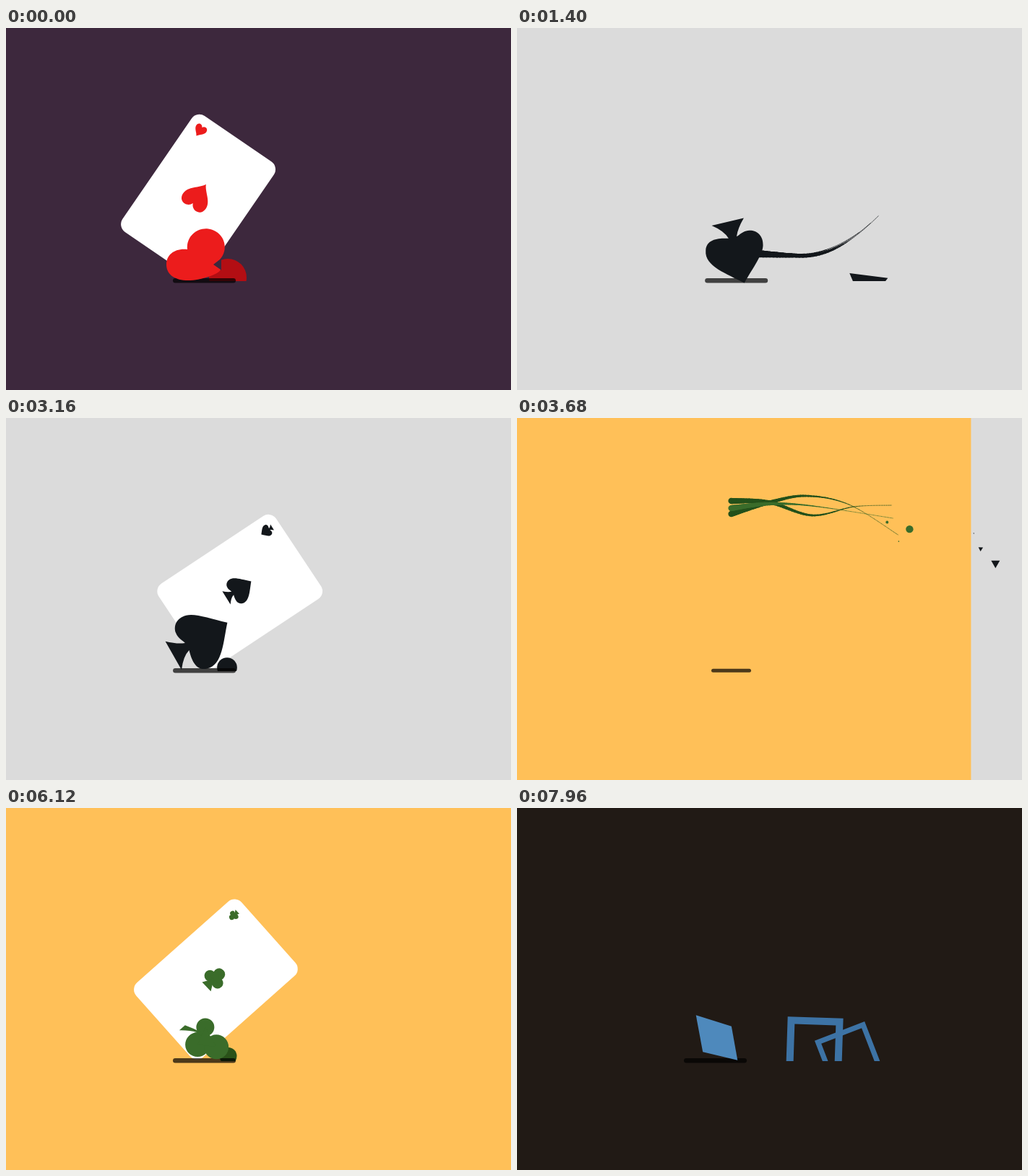
These frames come from a looping animation (699 px wide and 502 px high, 8000 ms). An HTML page with a canvas:

```html
<!DOCTYPE html>
<html lang="en">
<head>
<meta charset="utf-8">
<title>Rolling suits</title>
<style>
html, body { margin: 0; width: 100%; height: 100%; overflow: hidden; background: #3d283d; }
canvas { display: block; }
</style>
</head>
<body>
<canvas id="stage" width="699" height="502"></canvas>
<script>
const W = 699, H = 502, GROUND = 351, LOOP = 8000, TURN = 3000;
const ctx = document.getElementById('stage').getContext('2d');
const RAD = Math.PI / 180;

const clamp = v => Math.max(0, Math.min(1, v));
const lerp = (a, b, u) => a + (b - a) * u;
const smooth = u => (1 - Math.cos(Math.PI * clamp(u))) / 2;

// Eased value from [time, value] pairs.
function keys(t, list) {
  if (t <= list[0][0]) return list[0][1];
  for (let i = 1; i < list.length; i++) {
    const [t0, a] = list[i - 1], [t1, b] = list[i];
    if (t < t1) return lerp(a, b, smooth((t - t0) / (t1 - t0)));
  }
  return list[list.length - 1][1];
}

function circle(x, y, r) {
  ctx.beginPath();
  ctx.arc(x, y, r, 0, 7);
  ctx.fill();
}

function poly(points) {
  ctx.beginPath();
  points.forEach(([x, y]) => ctx.lineTo(x, y));
  ctx.closePath();
  ctx.fill();
}

function isolated(draw) {
  ctx.save();
  draw();
  ctx.restore();
}

function aboveGround(draw) {
  isolated(() => {
    ctx.beginPath();
    ctx.rect(0, 0, W, GROUND);
    ctx.clip();
    draw();
  });
}

// Shapes are drawn in stage coordinates at their resting pose.
const heartPath = new Path2D(
  'M251 307 A26 25.5 0 1 1 296 321 L287 328 L297 335 ' +
  'C296 341 268 351 249 350 C231 349 222 340 222 328 C222 314 234 305 251 307Z');
const heartPip = new Path2D(
  'M0 21 C-5 11 -19 5 -19 -7 C-19 -20 -4 -21 0 -11 C4 -21 19 -20 19 -7 C19 5 5 11 0 21Z');
const spadePath = new Path2D(
  'M305 294 C282 282 265 270 252 270 C238 270 231 280 232 290 C233 299 239 303 241 307 ' +
  'Q230 306 215 298 L227 342 Q234 324 244 318 C244 330 245 349 262 349 C284 350 293 318 305 294Z');

const clubLobes = [[288, 320, 16.5], [316, 306, 16.5], [311, 333, 17.5]];
const clubBent = [[293, 328, 17], [304, 304, 12.5], [319, 331.5, 17]];
const stem = [[303, 314], [272, 293], [306, 278]];
const stemBent = [[295, 311], [268, 308], [276, 301]];
const mix = (a, b, u) => a.map((row, i) => row.map((v, j) => lerp(v, b[i][j], u)));

function club(bend) {
  const lobes = mix(clubLobes, clubBent, bend);
  const [tip, left, right] = mix(stem, stemBent, bend);
  lobes.forEach(l => circle(...l));
  poly(lobes);
  const mid = side => [lerp((tip[0] + side[0]) / 2, 292, .12), lerp((tip[1] + side[1]) / 2, 296, .12)];
  ctx.beginPath();
  ctx.moveTo(...left);
  ctx.quadraticCurveTo(...mid(left), tip[0] - 3, tip[1]);
  ctx.lineTo(tip[0] + 3, tip[1]);
  ctx.quadraticCurveTo(...mid(right), ...right);
  ctx.fill();
}

const plainTail = [
  [[0, 0], [66, -15], [140, -27], [185, -22], [217, -11]],
  [[0, 0], [66, -15], [130, -20], [180, -18], [205, -14]],
  [[0, 0], [66, -14], [140, -12], [188, -17]]
];
const clubTail = [
  [[0, -10], [53, -8], [112, 10], [170, -2], [222, -4]],
  [[0, 8], [53, -8], [103, -17], [163, -5], [231, 37]],
  [[0, 0], [53, -6], [113, -3], [224, 14]]
];

const suits = [
  { bg: '#3d283d', ink: '#ec1c1c', dark: '#b30e13', base: 274.5, pivot: [262, 315], rest: 3000,
    draw: () => ctx.fill(heartPath), lobe: [307, 346, 26] },
  { bg: '#dbdbdb', ink: '#13171b', dark: '#13171b', base: 267.5, pivot: [263, 311], rest: 2280,
    draw: () => ctx.fill(spadePath), lobe: [306, 346, 16], pipTurn: -73, sides: 3, ringRest: 1960 },
  { bg: '#ffc058', ink: '#3a6c2a', dark: '#2a5219', base: 302.5, pivot: [302, 317], rest: 1560,
    draw: club, lobe: [307.5, 344, 12], pipTurn: 202, ringRest: 1560 },
  { bg: '#211a15', ink: '#4e89bc', dark: '#3d73a5', base: 274.5, pivot: [276.5, 318.5], rest: 1960,
    draw: () => poly([[248, 287], [297, 303], [305, 350], [257, 338]]),
    lobe: [306, 346, 14], sides: 4, ringRest: 1960 }
];

// Flight pose while each suit takes over.
const flights = [
  { x: 309.5, y: 139, shadow: 61, chips: [[618.5, 155, 6], [587.5, 145, 2.8], [603, 170.5, 1]] },
  { x: 296.5, y: 125, shadow: 55, chips: [[542.5, 154, 5.2], [511.5, 144.5, 2], [527.5, 171, .8]] },
  { x: 300, y: 130, shadow: 57, chips: [[580, 152, 5], [550, 144, 2.4], [566, 170, 1]] }
];
const lateChips = [[661, 202, 6], [640.5, 181.5, 3.2], [631, 160, .8]];

const headY = (p, f) => keys(p, [[150, 311], [480, f.y], [1100, f.y], [1330, 311]]);
const headX = (p, f) => keys(p, [[150, 274.5], [480, f.x], [1100, f.x], [1330, 304],
  [1560, 302.5], [1960, 274.5], [2280, 267.5], [2700, 268], [2960, 274.5]]);
const roll = q => -720 / 1400 * (Math.min(q, 2960) - 1560) - .6 * Math.max(0, q - 3120);

// Catmull-Rom sample of a strand.
function along(pts, u) {
  const s = u * (pts.length - 1), i = Math.min(Math.floor(s), pts.length - 2), f = s - i;
  const at = n => pts[Math.max(0, Math.min(pts.length - 1, n))];
  return [0, 1].map(k => {
    const [a, b, c, d] = [at(i - 1)[k], at(i)[k], at(i + 1)[k], at(i + 2)[k]];
    return b + .5 * f * (c - a + f * (2 * a - 5 * b + 4 * c - d + f * (3 * (b - c) + d - a)));
  });
}

function tail(i, p, f) {
  const len = keys(p, [[180, 0], [560, 1], [1330, 1], [1560, .57], [1680, 0]]);
  if (len <= 0) return;
  const isClub = i === 2, s = suits[i], x0 = headX(p, f);
  const sway = Math.cos((p - 680) / 260) * keys(p, [[1250, 1], [1480, 0]]);
  const width = isClub ? 8.5 : 15, power = isClub ? 1.6 : 2.5;
  ctx.lineCap = isClub ? 'round' : 'butt';
  (isClub ? clubTail : plainTail).forEach((pts, n) => {
    ctx.strokeStyle = isClub && n < 2 && p < 1400 ? '#23501a' : s.ink;
    let last;
    for (let k = 0; k <= 60; k++) {
      const u = k / 60, [dx, dy] = along(pts, u);
      const here = [x0 + dx * len, headY(p - .8 * dx * len, f) + dy * sway];
      if (last) {
        ctx.lineWidth = Math.max(.5, width * Math.pow(1 - u, power));
        ctx.beginPath();
        ctx.moveTo(...last);
        ctx.lineTo(...here);
        ctx.stroke();
        ctx.lineCap = 'round';
      }
      last = here;
    }
  });
}

function chips(i, p, f, list) {
  if (p < 400 || p > 950) return;
  const u = (p - 400) / 280;
  ctx.fillStyle = suits[i].ink;
  list.forEach(([x, y, r], n) => isolated(() => {
    ctx.translate(lerp(f.x, x, u), lerp(f.y, y, u));
    ctx.rotate((p - 680) / 220 + n * .05);
    if (i === 2) circle(0, 0, r);
    else if (i === 3) poly([[-r, 0], [0, -r], [r, 0], [0, r]]);
    else poly([[-r, -r * .75], [r, -r * .75], [0, r]]);
  }));
}

function rings(i, q) {
  const s = suits[i];
  if (!s.ringRest || q < 1340 || q > 2200) return;
  const left = (2200 - q) / 640, grow = smooth((q - 1340) / 180);
  const shift = .1 * (s.ringRest - q);
  const square = s.sides === 4;
  const pair = square ? [[412, 329, 2, 18, .6], [460, 344, -21, 16, .82]]
    : [[429, 329, 0, 18, .6], [477, 346, -20, 16, .82]];
  ctx.strokeStyle = s.dark;
  ctx.lineJoin = 'miter';
  aboveGround(() => pair.forEach(([x, y, angle, w, power]) => isolated(() => {
    ctx.translate(x + shift, y + 40 * (1 - grow));
    ctx.rotate((angle + (q - s.ringRest) * -.12) * RAD);
    ctx.lineWidth = w * Math.pow(left, power);
    ctx.beginPath();
    if (square) ctx.rect(-33.5 * grow, -33.5 * grow, 67 * grow, 67 * grow);
    else if (s.sides) {
      for (let a = 0; a < 3; a++) {
        ctx.lineTo(40 * grow * Math.sin(a * 120 * RAD), -40 * grow * Math.cos(a * 120 * RAD));
      }
      ctx.closePath();
    } else ctx.arc(0, 0, 37.5 * grow, 0, 7);
    ctx.stroke();
  })));
}

function pip(i, x, y, size, flip) {
  const s = suits[i];
  isolated(() => {
    ctx.translate(x, y);
    ctx.rotate(flip ? Math.PI : 0);
    ctx.scale(size, size);
    if (i === 0) {
      ctx.rotate(Math.PI);
      ctx.fill(heartPip);
    } else {
      ctx.scale(.47, .47);
      ctx.rotate((s.pipTurn || 0) * RAD);
      ctx.translate(-s.pivot[0], -s.pivot[1]);
      s.draw(0);
    }
  });
}

function card(i, c) {
  if (c < -100 || c > 400) return;
  const before = Math.min(0, c / 100) ** 2, after = Math.max(0, (c - 120) / 230) ** 2;
  isolated(() => {
    // The origin is the centre of the rounded corner that touches the ground.
    ctx.translate(264.5 - 420 * before + 620 * after, 335.5 - 60 * after);
    ctx.rotate((34.3 + .116 * c - 95 * before + 110 * after) * RAD);
    ctx.fillStyle = '#fff';
    ctx.beginPath();
    ctx.roundRect(-125, -182, 138, 195, 13);
    ctx.fill();
    ctx.fillStyle = suits[i].ink;
    pip(i, -57, -84, 1, false);
    pip(i, -106, -162, .44, true);
  });
}

function lobe(i, c) {
  const size = keys(c, [[-80, 0], [0, 1], [130, 1], [260, 0]]);
  if (size <= 0) return;
  const [x, y, r] = suits[i].lobe;
  aboveGround(() => {
    ctx.fillStyle = suits[i].dark;
    circle(x, y, r * size);
  });
  if (i === 0 && size > .9) poly([[285, 328], [298, 320], [298, 336]]);
}

function shadow(p, f) {
  const w = keys(p, [[150, 87], [480, f.shadow], [1100, f.shadow], [1330, 87]]);
  const h = lerp(5, 6.5, clamp((w - f.shadow) / (87 - f.shadow)));
  ctx.fillStyle = 'rgba(0,0,0,.7)';
  ctx.beginPath();
  ctx.roundRect(headX(p, f) - w / 2, 350.3 - h / 2, w, h, h / 2);
  ctx.fill();
}

function body(i, q, p, f) {
  const size = keys(p, [[150, 1], [400, 0], [1270, 0], [1400, 1]]);
  if (size <= 0) return;
  const s = suits[i], [px, py] = s.pivot;
  isolated(() => {
    ctx.translate(headX(p, f) - s.base + px, headY(p, f) - 311 + py);
    ctx.rotate((roll(q) - roll(s.rest)) * RAD);
    ctx.scale(size, size);
    ctx.translate(-px, -py);
    ctx.fillStyle = s.ink;
    s.draw(smooth((q - 2900) / 100));
  });
}

function scene(i, q, f) {
  const leaving = q >= TURN, p = leaving ? q - TURN : q;
  ctx.fillStyle = suits[i].bg;
  ctx.fillRect(0, 0, W, H);
  card(i, q - TURN);
  rings(i, q);
  lobe(i, q - TURN);
  shadow(p, f);
  tail(i, p, f);
  body(i, q, p, f);
  if (!leaving) chips(i, p, f, f.chips);
  else if (i > 0) chips(i, p, f, lateChips);
}

function render(t) {
  const n = Math.floor(t / TURN), p = t % TURN, f = flights[n];
  const edge = W * smooth((p - 326) / 447);
  if (edge < W) scene(n, p + TURN, f);
  if (edge > 0) isolated(() => {
    ctx.beginPath();
    ctx.rect(0, 0, edge, H);
    ctx.clip();
    scene(n + 1, p, f);
  });
}

const start = performance.now();
function tick() {
  render((performance.now() - start) % LOOP);
  requestAnimationFrame(tick);
}
tick();
</script>
</body>
</html>
```
